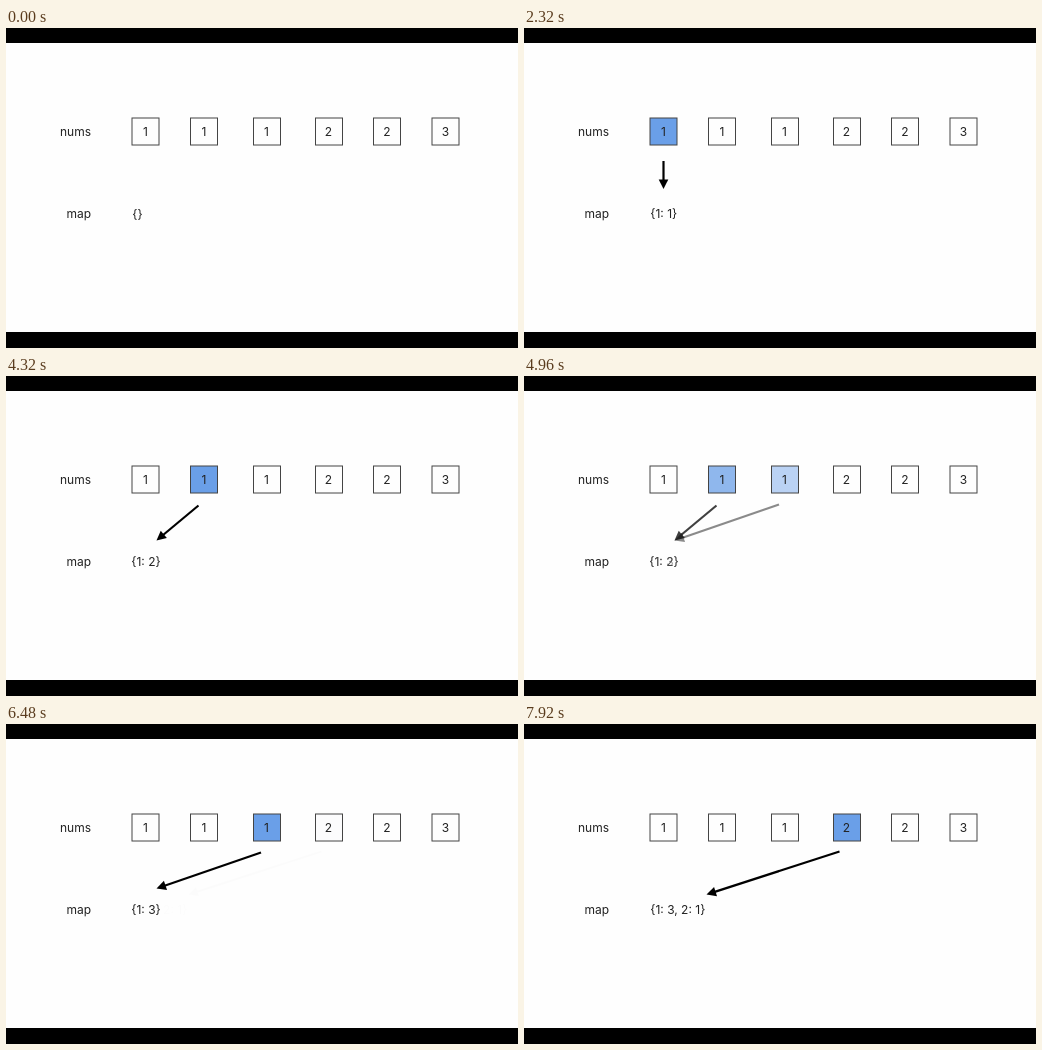
Recreate the animation shown at these times as an HTML page. Size 512 by 320 pixels, loop 8 s.

```html
<!DOCTYPE html>
<html lang="en">
<head>
<meta charset="utf-8">
<title>Counting numbers in a map</title>
<style>
  html, body { margin: 0; width: 100%; height: 100%; overflow: hidden; background: #fefefe; }
  svg { display: block; width: 512px; height: 320px; }
  text { font: 12px Inter, sans-serif; fill: #222; }
</style>
</head>
<body>
<svg id="stage" viewBox="0 0 512 320">
  <rect width="512" height="320" fill="#fefefe"/>
  <rect width="512" height="15" fill="#000"/>
  <rect y="304" width="512" height="16" fill="#000"/>
  <text x="85" y="107.5" text-anchor="end">nums</text>
  <text x="85" y="189.7" text-anchor="end">map</text>
</svg>
<script>
const LOOP = 8000, TICK = 80, FADE = 1440, LAG = 0.12;
const nums = [1, 1, 1, 2, 2, 3];
const boxX = [126, 184.5, 247, 309, 367.5, 426];

// start: when the dissolve into the scene begins; arrow: x1, y1, x2, y2
const scenes = [
  { start: -LOOP, text: "{}", x: 126.3 },
  { start: 460, text: "{1: 1}", x: 126.3, box: 0, arrow: [139.5, 133, 139.5, 161] },
  { start: 2400, text: "{1: 2}", x: 125.3, box: 1, arrow: [192.5, 129.5, 150.5, 164.5] },
  { start: 4368, text: "{1: 3}", x: 125.3, box: 2, arrow: [255, 128.5, 150.5, 164.5] },
  { start: 6420, text: "{1: 3, 2: 1}", x: 126.3, box: 3, arrow: [315.5, 127.5, 182.5, 170.5] }
];

const stage = document.getElementById("stage");

function add(parent, tag, attrs, text = "") {
  const el = document.createElementNS("http://www.w3.org/2000/svg", tag);
  for (const key in attrs) el.setAttribute(key, attrs[key]);
  el.textContent = text;
  return parent.appendChild(el);
}

function addArrow(parent, [x1, y1, x2, y2]) {
  const length = Math.hypot(x2 - x1, y2 - y1);
  const angle = Math.atan2(y2 - y1, x2 - x1) * 180 / Math.PI;
  const g = add(parent, "g", { transform: `translate(${x1} ${y1}) rotate(${angle})` });
  add(g, "path", { d: `M0 0H${length - 7}`, stroke: "#000", "stroke-width": 2.2 });
  add(g, "path", { d: `M${length} 0l-9.5 -4.8v9.6z` });
}

for (const s of scenes) {
  s.layer = add(stage, "g", {});
  if (s.arrow) {
    add(s.layer, "rect", { x: boxX[s.box], y: 90, width: 27, height: 27, fill: "#6a9fe8" });
    addArrow(s.layer, s.arrow);
  }
  add(s.layer, "text", { x: s.x, y: 189.8 }, s.text);
}

nums.forEach((n, i) => {
  add(stage, "rect", {
    x: Math.floor(boxX[i]) + 0.5 - (i === 0 || i === 5 ? 0.5 : 0), y: 90, width: 27, height: 27,
    fill: "none", stroke: "#444"
  });
  add(stage, "text", { x: boxX[i] + 13.5, y: 107.8, "text-anchor": "middle" }, n);
});

function ease(x) {
  x = Math.min(1, Math.max(0, x));
  return x * x * (3 - 2 * x);
}

// The old scene leaves slightly later than the new one arrives
function opacity(i, t) {
  const shown = ease((t - scenes[i].start) / FADE / (1 - LAG));
  const next = scenes[i + 1];
  const gone = next ? ease(((t - next.start) / FADE - LAG) / (1 - LAG)) : 0;
  return shown * (1 - gone);
}

function draw() {
  const t = Math.floor(performance.now() % LOOP / TICK) * TICK;
  scenes.forEach((s, i) => s.layer.setAttribute("opacity", opacity(i, t).toFixed(3)));
  requestAnimationFrame(draw);
}
draw();
</script>
</body>
</html>
```
